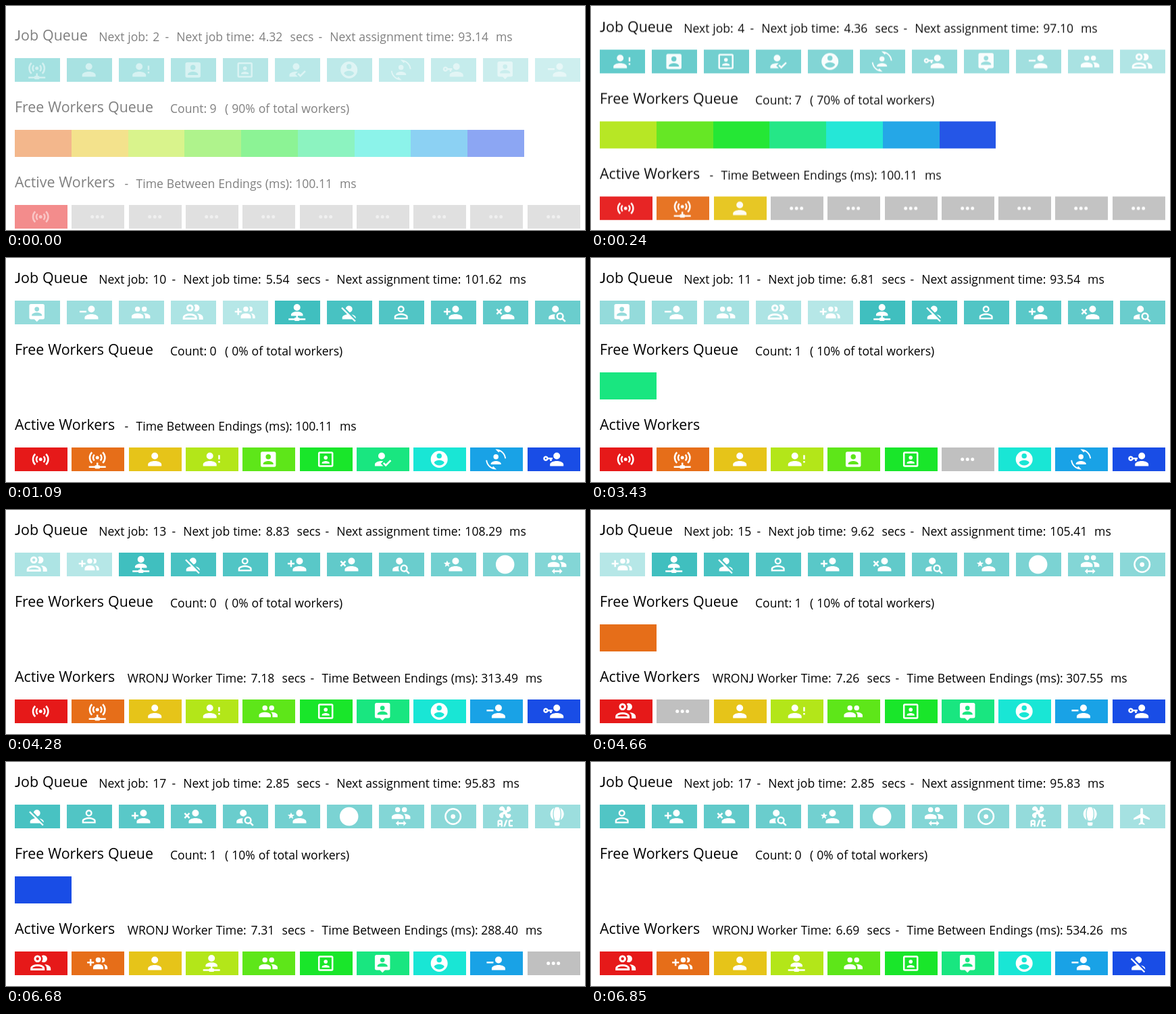
Recreate the animation shown at these times as an HTML page. Size 857 by 331 pixels, loop 8 s.

```html
<!DOCTYPE html>
<html lang="en">
<head>
<meta charset="utf-8">
<title>Job queue</title>
<style>
  html, body { margin: 0; width: 100%; height: 100%; overflow: hidden; background: #fff; }
  svg { display: block; width: 100vw; height: 100vh; }
  text { font: 17.57px "Open Sans", "Noto Sans", sans-serif; word-spacing: .4px; white-space: pre; }
  .head { font-size: 21.4px; }
  .j { font-family: Lato, sans-serif; }
  .icon { fill: #fff; fill-rule: evenodd; }
</style>
</head>
<body>
<svg id="stage" viewBox="0 0 857 331"><g id="board"></g></svg>
<script>
const LOOP = 8000, STEP = 77.8, DIGIT = 10.05;
const ROWS = [0, 106, 217];

// Icon parts on a 24-unit grid, filled even-odd
const disc = (x, y, r) =>
  `M${x - r},${y}a${r},${r} 0 1 0 ${2 * r},0a${r},${r} 0 1 0 ${-2 * r},0z`;
const person = x =>
  disc(x, 8, 4) + `M${x},14c4.42,0 8,1.79 8,4v2h-16v-2c0,-2.21 3.58,-4 8,-4z`;
const frame = 'M5,3H19A2,2 0 0 1 21,5V19A2,2 0 0 1 19,21H5A2,2 0 0 1 3,19V5A2,2 0 0 1 5,3z';
const bust = 'M6,17C6,15 10,13.9 12,13.9C14,13.9 18,15 18,17V18H6z' + disc(12, 9, 3);
const node = y => `M13,${y - 3}V${y}H14A1,1 0 0 1 15,${y + 1}H22V${y + 3}H15A1,1 0 0 1 14,${y + 4}H10` +
  `A1,1 0 0 1 9,${y + 3}H2V${y + 1}H9A1,1 0 0 1 10,${y}H11V${y - 3}z`;
const pair = y => disc(8, y, 3) + disc(16, y, 3) +
  `M8,${y + 5}c-2.33,0 -7,1.17 -7,3.5v2.5h14v-2.5c0,-2.33 -4.67,-3.5 -7,-3.5z` +
  `M16,${y + 5}l-.97,.05c1.16,.84 1.97,1.95 1.97,3.45v2.5h6v-2.5c0,-2.33 -4.67,-3.5 -7,-3.5z`;

function waves(cy) {
  let d = disc(12, cy, 2);
  for (const r of [9, 5]) for (const s of [-1, 1]) {
    const a = (r + 1) * Math.SQRT1_2, b = (r - 1) * Math.SQRT1_2, cw = s > 0 ? 1 : 0;
    d += `M${12 + s * a},${cy - a}A${r + 1},${r + 1} 0 0 ${cw} ${12 + s * a},${cy + a}` +
      `L${12 + s * b},${cy + b}A${r - 1},${r - 1} 0 0 ${1 - cw} ${12 + s * b},${cy - b}z`;
  }
  return d;
}

const DOTS = disc(6, 12, 2) + disc(12, 12, 2) + disc(18, 12, 2);
const WIDE = 14;
const ICONS = [
  DOTS,
  waves(12),
  waves(10) + node(19),
  person(12),
  person(10) + 'M20,12V7H22V12zM20,16V14H22V16z',
  frame + bust,
  frame + 'M5,5H19V19H5zM16.5,16.25C16.5,14.75 13.5,14 12,14C10.5,14 7.5,14.75 7.5,16.25V17H16.5z' + disc(12, 10, 2.25),
  disc(11, 8, 4) + 'M21.1,12.5L22.5,13.91L15.97,20.5L12.5,17L13.9,15.59L15.97,17.67zM10,17L13,20H3V18C3,15.79 6.58,14 11,14L12.89,14.11z',
  disc(12, 12, 10) + disc(12, 8, 3) + 'M12,19.2C9.5,19.2 7.29,17.92 6,16C6.03,14 10,12.9 12,12.9C14,12.9 17.97,14 18,16C16.71,17.92 14.5,19.2 12,19.2z',
  bust + 'M7.5,21.5L8.85,20.16L12.66,23.97L12,24C5.71,24 .56,19.16 .05,13H1.55C1.91,16.76 4.25,19.94 7.5,21.5z' +
    'M16.5,2.5L15.15,3.84L11.34,.03L12,0C18.29,0 23.44,4.84 23.95,11H22.45C22.09,7.24 19.75,4.07 16.5,2.5z',
  person(16) + disc(3, 11, 1) + 'M11,10V12H10V14H8V12H5.83A3,3 0 1 1 5.83,10z',
  'M5,2H19A2,2 0 0 1 21,4V18A2,2 0 0 1 19,20H15L12,23L9,20H5A2,2 0 0 1 3,18V4A2,2 0 0 1 5,2z' +
    disc(12, 8, 2.7) + 'M18,16H6V15.1C6,13.1 10,12 12,12C14,12 18,13.1 18,15.1z',
  person(15) + 'M1,10V12H9V10z',
  pair(8),
  disc(9, 7.5, 3.5) + disc(9, 7.5, 1.5) +
    'M13.07,10.41A5,5 0 0 0 13.07,4.59A3.39,3.39 0 0 1 15,4A3.5,3.5 0 0 1 15,11A3.39,3.39 0 0 1 13.07,10.41z' +
    'M16,17V19H2V17S2,13 9,13 16,17 16,17zM14,17C13.86,16.22 12.67,15 9,15S4.07,16.31 4,17z' +
    'M15.95,13A5.32,5.32 0 0 1 18,17V19H22V17S22,13.37 15.95,13z',
  disc(13, 8, 3) + 'M19,17V19H7V17S7,13 13,13 19,17 19,17zM19.2,13.06A5.6,5.6 0 0 1 21,17V19H24V17S24,13.55 19.2,13.06z' +
    'M18,5A2.91,2.91 0 0 0 17.11,5.14A5,5 0 0 1 17.11,10.86A2.91,2.91 0 0 0 18,11A3,3 0 0 0 18,5zM8,10H5V7H3V10H0V12H3V15H5V12H8z',
  disc(12, 6, 4) + 'M5,16V14.5C5,12.57 8.13,11 12,11C15.87,11 19,12.57 19,14.5V16H13V18H14A1,1 0 0 1 15,19H22V21H15' +
    'A1,1 0 0 1 14,22H10A1,1 0 0 1 9,21H2V19H9A1,1 0 0 1 10,18H11V16z',
  'M12,4A4,4 0 0 1 16,8C16,9.95 14.6,11.58 12.75,11.93L8.07,7.25C8.42,5.4 10.05,4 12,4z' +
    'M12.28,14L20,21.72L18.73,23L15.73,20H4V18C4,16.16 6.5,14.61 9.87,14.14L2.78,7.05L4.05,5.78zM20,18V19.18L15.14,14.32C18,14.93 20,16.35 20,18z',
  disc(12, 8, 4) + disc(12, 8, 2.1) + 'M12,13C9.33,13 4,14.33 4,17V20H20V17C20,14.33 14.67,13 12,13z' +
    'M12,14.9C14.97,14.9 18.1,16.36 18.1,17V18.1H5.9V17C5.9,16.36 9,14.9 12,14.9z',
  person(15) + 'M6,10V7H4V10H1V12H4V15H6V12H9V10z',
  person(15) + 'M5,9.59L7.12,7.46L8.54,8.88L6.41,11L8.54,13.12L7.12,14.54L5,12.41L2.88,14.54L1.46,13.12L3.59,11L1.46,8.88L2.88,7.46z',
  'M15.5,12A4.5,4.5 0 0 1 20,16.5C20,17.38 19.75,18.21 19.31,18.9L22.39,22L21,23.39L17.88,20.32A4.5,4.5 0 1 1 15.5,12z' +
    disc(15.5, 16.5, 2.5) + 'M10,4A4,4 0 0 1 14,8C14,8.91 13.69,9.75 13.18,10.43C12.32,10.75 11.55,11.26 10.91,11.9L10,12A4,4 0 0 1 10,4z' +
    'M2,20V18C2,15.88 5.31,14.14 9.5,14C9.18,14.78 9,15.62 9,16.5C9,17.79 9.38,19 10,20z',
  person(15) + 'M5,13.28L7.45,14.77L6.8,11.96L9,10.08L6.11,9.83L5,7.19L3.87,9.83L1,10.08L3.18,11.96L2.5,14.77z',
  disc(12, 12, 11),
  pair(4) + 'M9,16.75V19H15V16.75L18.25,20L15,23.25V21H9V23.25L5.75,20z',
  disc(12, 12, 10) + disc(12, 12, 8) + disc(12, 12, 2.7),
  'M6.59,.66C8.93,-1.15 11.47,1.06 12.04,4.5C12.47,4.5 12.89,4.62 13.27,4.84C13.79,4.24 14.25,3.42 14.07,2.5C13.65,.35 16.06,-1.39 18.35,1.58' +
    'C20.16,3.92 17.95,6.46 14.5,7.03C14.5,7.46 14.39,7.89 14.16,8.27C14.76,8.78 15.58,9.24 16.5,9.06C18.63,8.64 20.38,11.04 17.41,13.34' +
    'C15.07,15.15 12.53,12.94 11.96,9.5C11.53,9.5 11.11,9.37 10.74,9.15C10.22,9.75 9.75,10.58 9.93,11.5C10.35,13.64 7.94,15.39 5.65,12.42' +
    'C3.83,10.07 6.05,7.53 9.5,6.97C9.5,6.54 9.63,6.12 9.85,5.74C9.25,5.23 8.43,4.76 7.5,4.94C5.37,5.36 3.62,2.96 6.59,.66z' +
    'M5,16H7A2,2 0 0 1 9,18V24H7V22H5V24H3V18A2,2 0 0 1 5,16zM5,18V20H7V18zM12.93,16H15L12.07,24H10zM18,16H21V18H18V22H21V24H18A2,2 0 0 1 16,22V18A2,2 0 0 1 18,16z',
  'M11,23A2,2 0 0 1 9,21V19H15V21A2,2 0 0 1 13,23zM12,1C12.71,1 13.39,1.09 14.05,1.26C15.22,2.83 16,5.71 16,9C16,11.28 15.62,13.37 15,15' +
    'A2,2 0 0 1 13,17H11A2,2 0 0 1 9,15C8.38,13.37 8,11.28 8,9C8,5.71 8.78,2.83 9.95,1.26C10.61,1.09 11.29,1 12,1z' +
    'M20,9C20,12.18 18.15,14.92 15.96,16.21C16.61,14.39 17,11.83 17,9C17,6.17 16.41,3.61 15.46,1.79C18.15,3.08 20,5.82 20,9z' +
    'M4,9C4,5.82 5.85,3.08 8.54,1.79C7.59,3.61 7,6.17 7,9C7,11.83 7.39,14.39 8.04,16.21C5.85,14.92 4,12.18 4,9z',
  'M21,16V14L13,9V3.5A1.5,1.5 0 0 0 10,3.5V9L2,14V16L10,13.5V19L8,20.5V22L11.5,21L15,22V20.5L13,19V13.5z'
];

// Job time (secs) and assignment time (ms), from job 2 on
const FORECAST = [
  [4.32, 93.14], [4.11, 95.27], [4.36, 97.10], [4.58, 98.42], [4.73, 99.06], [4.95, 98.81],
  [5.12, 100.37], [5.31, 101.05], [5.54, 101.62], [6.81, 93.54], [7.64, 101.18], [8.83, 108.29],
  [9.17, 106.73], [9.62, 105.41], [10.04, 104.96], [2.85, 95.83]
];
// Worker time (secs) and time between endings (ms), from the second ending on
const ENDINGS = [[7.04, 620.18], [7.18, 313.49], [7.22, 310.27], [7.26, 307.55], [7.31, 288.40], [6.69, 534.26]];

// First ten jobs, then [freed, taken, worker, noted]
const STARTS = [0, 160, 240, 390, 470, 620, 700, 850, 920, 1090];
const TURNS = [
  [3430, 3500, 6], [4050, 4120, 8], [4200, 4280, 4], [4360, 4510, 0],
  [4660, 4740, 1], [4970, 5050, 3], [6680, 6850, 9, 6760]
];
const EVENTS = STARTS.map(at => ({ at, type: 'take' }));
for (const [freed, taken, worker, noted = freed] of TURNS) {
  EVENTS.push({ at: freed, type: 'free', worker }, { at: noted, type: 'note' }, { at: taken, type: 'take' });
}

function stateAt(t) {
  const s = { jobs: Array(10).fill(0), free: [...Array(10).keys()], taken: 0, next: 1, ended: 0 };
  for (const e of EVENTS) {
    if (e.at > t) break;
    if (e.type === 'note') s.ended++;
    if (e.type === 'free') { s.jobs[e.worker] = 0; s.free.push(e.worker); }
    if (e.type === 'take') s.jobs[s.free.shift()] = ++s.taken;
    if (s.free.length) s.next = s.taken + 1;
  }
  return s;
}

const board = document.getElementById('board');
function add(tag, attrs) {
  const el = document.createElementNS('http://www.w3.org/2000/svg', tag);
  for (const k in attrs) el.setAttribute(k, attrs[k]);
  return board.appendChild(el);
}
const markup = s => s.replace(/J/g, '<tspan class="j">J</tspan>');

function tile(x, y, width) {
  const rect = add('rect', { x, y, width, height: 35 });
  const icon = add('path', { class: 'icon' });
  return (fill, id) => {
    const k = id === WIDE ? 1.5 : 1.25;
    rect.setAttribute('fill', fill);
    icon.setAttribute('d', ICONS[id]);
    icon.setAttribute('transform', `translate(${x + width / 2 - 0.8 - 12 * k} ${y + 17.5 - 12 * k}) scale(${k})`);
  };
}

// A line of parts [x, text, usual length]; longer numbers push the rest right
function line(y, count) {
  const nodes = Array.from({ length: count }, () => add('text', { y }));
  return parts => {
    let shift = 0;
    nodes.forEach((node, i) => {
      const [x, text, usual] = parts[i] || [0, ''];
      node.setAttribute('x', x + shift);
      node.innerHTML = markup(text);
      if (usual) shift += (text.length - usual) * DIGIT;
    });
  };
}

['Job Queue', 'Free Workers Queue', 'Active Workers'].forEach((s, i) => {
  add('text', { x: 13, y: ROWS[i] + 37, class: 'head' }).innerHTML = markup(s);
});
const jobLine = line(38, 10), freeLine = line(ROWS[1] + 38, 3), activeLine = line(ROWS[2] + 38, 7);
const queue = Array.from({ length: 11 }, (_, i) => tile(13 + 77 * i, 63, 67));
const freeBars = Array.from({ length: 10 }, (_, i) =>
  add('rect', { x: 13 + 83.75 * i, y: ROWS[1] + 63, width: 83.75, height: 40, 'shape-rendering': 'crispEdges' }));
const workers = Array.from({ length: 10 }, (_, i) => tile(Math.round(13 + 84.3 * i), ROWS[2] + 63, 78));

const workerColor = i => `hsl(${25 * i}, 80%, 50%)`;
const jobColor = n => `hsl(180, 50%, ${50 + 2.2 * ((n - 1) % 15)}%)`;

function jobParts(next) {
  const [secs, ms] = FORECAST[next - 2];
  return [
    [137.2, 'Next job:'], [217.3, String(next), 1], [235.5, '-'],
    [252.2, 'Next job time:'], [374.6, secs.toFixed(2), 4], [420.5, 'secs'], [462.5, '-'],
    [479.2, 'Next assignment time:'], [669.3, ms.toFixed(2), 5], [725, 'ms']
  ];
}

function activeParts(ended) {
  if (ended === 1) return [];
  const [secs, gap] = ended ? ENDINGS[ended - 2] : [0, 100.11];
  const dx = ended ? 275 : 0;
  const parts = [
    [175.5 + dx, '-'], [192.5 + dx, 'Time Between Endings (ms):'],
    [428.2 + dx, gap.toFixed(2), 6], [494 + dx, 'ms']
  ];
  if (ended) parts.unshift([179.7, 'WRONJ Worker Time:'], [362.5, secs.toFixed(2), 4], [408.5, 'secs']);
  return parts;
}

let shown = '';
function draw(t) {
  const s = stateAt(t);
  let veil = 0.5 * 10 ** (-Math.floor(t / STEP) * STEP / 240);
  if (veil < 0.002) veil = 0;
  const key = [s.taken, s.free, s.ended, veil].join('|');
  if (key === shown) return;
  shown = key;

  board.setAttribute('transform', `translate(0 ${28 * veil})`);
  board.setAttribute('opacity', 1 - veil);
  board.querySelectorAll('.icon').forEach(el => el.setAttribute('opacity', 1 - veil));

  const n = s.free.length;
  jobLine(jobParts(s.next));
  freeLine([[243, 'Count:'], [301.5, String(n), 1], [324, `( ${n * 10}% of total workers)`]]);
  activeLine(activeParts(s.ended));

  queue.forEach((set, i) => set(jobColor(s.taken + 1 + i), s.taken + 1 + i));
  workers.forEach((set, i) => set(s.jobs[i] ? workerColor(i) : '#c0c0c0', s.jobs[i]));
  freeBars.forEach((bar, i) => {
    bar.setAttribute('visibility', i < n ? 'visible' : 'hidden');
    if (i < n) bar.setAttribute('fill', workerColor(s.free[i]));
  });
}

const start = performance.now();
function tick() {
  draw((performance.now() - start) % LOOP);
  requestAnimationFrame(tick);
}
tick();
</script>
</body>
</html>
```
